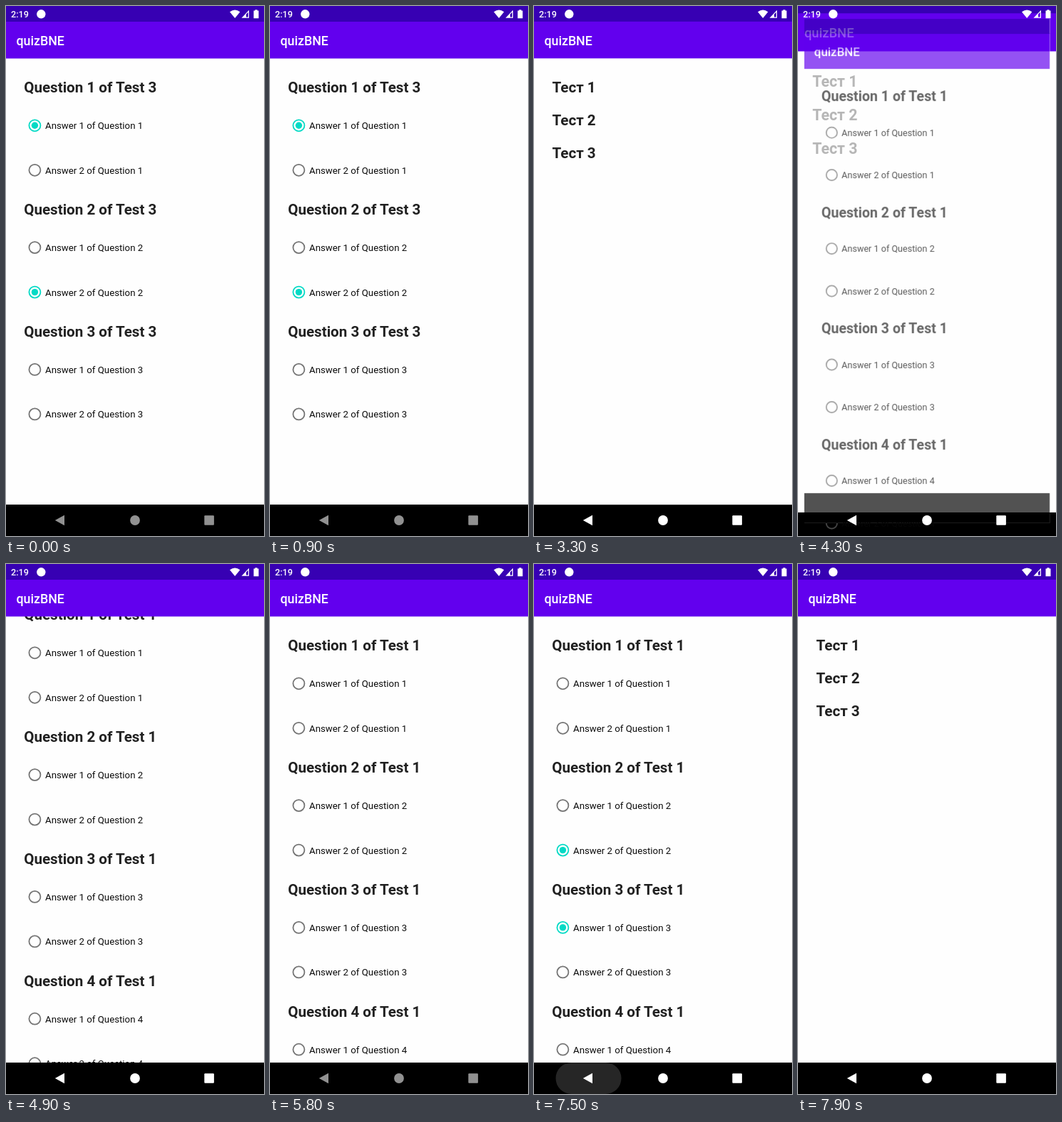
An HTML page that plays this animation: 362x742 px, repeating every 8000 ms.

```html
<!DOCTYPE html>
<html lang="en">
<head>
<meta charset="utf-8">
<title>Quiz app</title>
<style>
  html, body { margin: 0; width: 100%; height: 100%; overflow: hidden; background: #000; }
  svg { display: block; width: 362px; height: 742px; }
  text { font-family: Roboto, "Noto Sans", sans-serif; white-space: pre; }
  .head { font-size: 20.6px; font-weight: 700; fill: #212121; }
  .answer { font-size: 13.25px; fill: #0c0c0c; }
  .app { font-size: 17.8px; font-weight: 500; fill: #fff; }
  .clock { font-size: 12.6px; font-weight: 500; }
  .ring { fill: none; stroke: #757575; stroke-width: 1.8; }
  .ring.on { stroke: #03dac5; }
  .dot, .ripple { fill: #03dac5; }
</style>
</head>
<body>
<svg id="stage" viewBox="0 0 362 742">
  <g id="screens"></g>
  <g fill="#fff">
    <text class="clock" x="7" y="16">2:19</text>
    <circle cx="49.3" cy="11.3" r="6.2"/>
    <path d="M314 8.3Q321.2 2.8 328.4 8.3L321.2 17Z"/>
    <path d="M330.5 16.8L341 5.8V16.8ZM337 11.6V15.6H339.8V8.8Z" fill-rule="evenodd"/>
    <path d="M347.5 6.5H349.4V5.2H352.6V6.5H354.5V17.2H347.5Z"/>
  </g>
  <rect id="press" x="30.5" y="698" width="92" height="44" rx="22" fill="#fff"/>
  <g id="nav" fill="#fff">
    <path d="M68.8 720L82 712.8V727.2Z"/>
    <circle cx="181" cy="720" r="6.9"/>
    <rect x="278.3" y="713.2" width="13.6" height="13.6" rx="1"/>
  </g>
</svg>
<script>
const LOOP = 8000, STEP = 100;
const BACK = [2870, 7430];   // touches on the back button
const CLOSE = BACK.map(t => t + 140);
const OPEN = 4216;
const SCROLL = [[4700, 0], [4800, 14], [4900, 43], [5000, 92], [5100, 140], [5200, 165],
  [5300, 165], [5400, 140], [5500, 80], [5600, 25], [5700, 0]];
const TAPS = { '2-2': 6200, '3-1': 6800 };

const $ = id => document.getElementById(id);
const ramp = (t, from, span) => Math.min(1, Math.max(0, (t - from) / span));

function add(parent, tag, attrs, text) {
  const el = document.createElementNS('http://www.w3.org/2000/svg', tag);
  for (const key in attrs) el.setAttribute(key, attrs[key]);
  if (text) el.textContent = text;
  parent.append(el);
  return el;
}

function bezier([a, b, c, d], u) {
  const v = 1 - u;
  return a * v * v * v + 3 * b * v * v * u + 3 * c * v * u * u + d * u * u * u;
}

// Fast start, very slow finish: two joined cubic curves
function ease(x) {
  if (x <= 0 || x >= 1) return x <= 0 ? 0 : 1;
  const [xs, ys] = x < 1 / 6
    ? [[0, .05, .13333, 1 / 6], [0, 0, .06, .4]]
    : [[1 / 6, .20833, .25, 1], [.4, .82, 1, 1]];
  let lo = 0, hi = 1;
  for (let i = 0; i < 24; i++) {
    const mid = (lo + hi) / 2;
    if (bezier(xs, mid) < x) lo = mid; else hi = mid;
  }
  return bezier(ys, lo);
}

function makeScreen(fill) {
  const root = add($('screens'), 'g');
  add(root, 'rect', { width: 362, height: 742, fill: '#fefefe' });
  const body = add(root, 'g');
  fill(body);
  add(root, 'rect', { y: 21, width: 362, height: 52.5, fill: '#6200ee' });
  add(root, 'rect', { width: 362, height: 22, fill: '#3700b3' });
  add(root, 'rect', { y: 698, width: 362, height: 44, fill: '#000' });
  add(root, 'text', { class: 'app', x: 14.5, y: 55 }, 'quizBNE');
  return { root, body };
}

function makeRadio(parent, y, label) {
  const at = { cx: 40.4, cy: y };
  const ripple = add(parent, 'circle', { class: 'ripple', ...at, r: 17.6, opacity: 0 });
  const ring = add(parent, 'circle', { class: 'ring', ...at, r: 8 });
  const dot = add(parent, 'circle', { class: 'dot', ...at, r: 0 });
  add(parent, 'text', { class: 'answer', x: 55, y: y + 4.9 }, label);
  return { ripple, ring, dot };
}

function makeTest(test, count) {
  const radios = {};
  const screen = makeScreen(body => {
    for (let q = 1; q <= count; q++) {
      const y = 121.2 + (q - 1) * 170.8;
      add(body, 'text', { class: 'head', x: 25.2, y }, `Question ${q} of Test ${test}`);
      for (let a = 1; a <= 2; a++)
        radios[q + '-' + a] = makeRadio(body, y - 16.4 + a * 62.5, `Answer ${a} of Question ${q}`);
    }
  });
  return { ...screen, radios };
}

function check(radio, amount, glow) {
  radio.ring.classList.toggle('on', amount > 0);
  radio.dot.setAttribute('r', 4.7 * amount);
  radio.ripple.setAttribute('opacity', glow);
}

function place(screen, scale, alpha) {
  screen.root.setAttribute('transform', `translate(181 371) scale(${scale}) translate(-181 -371)`);
  screen.root.setAttribute('opacity', alpha);
}

function scrollAt(t) {
  for (let i = 1; i < SCROLL.length; i++) {
    const [t0, y0] = SCROLL[i - 1], [t1, y1] = SCROLL[i];
    if (t >= t0 && t < t1) return y0 + (y1 - y0) * (t - t0) / (t1 - t0);
  }
  return 0;
}

const list = makeScreen(body => {
  for (let i = 1; i <= 3; i++)
    add(body, 'text', { class: 'head', x: 25.5, y: 75.5 + i * 45.7 }, 'Тест ' + i);
});
const test1 = makeTest(1, 5), test3 = makeTest(3, 3);
check(test3.radios['1-1'], 1, 0);
check(test3.radios['2-2'], 1, 0);

function render(t) {
  const [shut3, shut1] = CLOSE.map(at => ease((t - at) / 400));
  const opened = ease((t - OPEN) / 400);
  const gone = CLOSE.map(at => ramp(t, at + 35, 50));

  place(list, 1 + .05 * (1 - shut3 + opened - shut1), 1);
  place(test3, 1 - .1 * shut3, 1 - gone[0]);
  place(test1, .85 + .15 * opened - .1 * shut1, ramp(t, OPEN + 50, 50) * (1 - gone[1]));
  test1.body.setAttribute('transform', `translate(0 ${-scrollAt(t)})`);

  for (const key in TAPS) {
    const at = TAPS[key];
    const glow = t < at ? 0 : .22 * (1 - ramp(t, at + 50, 300));
    check(test1.radios[key], ramp(t, at - 50, 150), glow);
  }

  const press = BACK.map(at => ramp(t, at, 60) * (1 - ramp(t, at + 130, 300)));
  $('press').setAttribute('opacity', .15 * Math.max(...press));

  const awake = t >= BACK[1] ? 1 : t >= BACK[0] ? 1 - ramp(t, 5300, 400) : 0;
  $('nav').setAttribute('opacity', .57 + .43 * awake);
}

const start = performance.now();
function tick() {
  const t = performance.now() - start + 20;
  render(Math.floor(t / STEP) * STEP % LOOP);
  requestAnimationFrame(tick);
}
tick();
</script>
</body>
</html>
```
